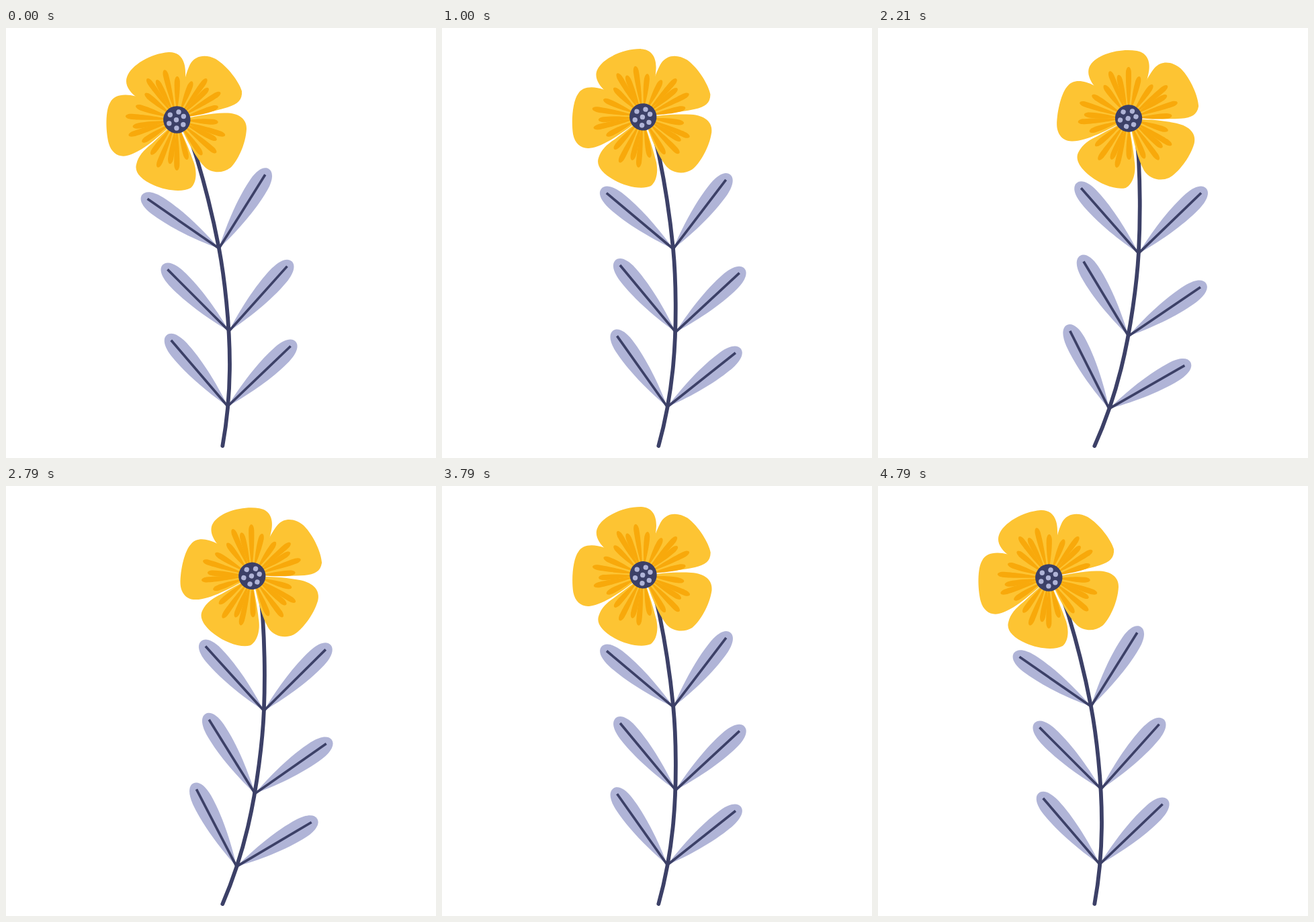
Recreate the animation shown at these times as an HTML page. Size 640 by 640 pixels, loop 4870 ms.

```html
<!DOCTYPE html>
<html lang="en">
<head>
<meta charset="utf-8">
<title>Swaying flower</title>
<style>
  html, body { margin: 0; width: 100%; height: 100%; overflow: hidden; background: #fff; }
  svg { display: block; width: 100%; height: 100%; }
  .leaf { fill: #b0b4d7; }
  .stem, .vein { fill: none; stroke: #3c4067; }
  .stem { stroke-width: 5.8; stroke-linecap: round; }
  .vein { stroke-width: 3.7; }
  .petal { fill: #fdc433; }
  .streak { fill: #f8a90b; }
  .eye { fill: #3c4067; }
  .seed { fill: #b0b4d7; }
</style>
</head>
<body>
<svg viewBox="0 0 640 640">
  <g id="plant">
    <g id="leaves"></g>
    <path class="stem" d="M322.3 622C327 596 333 555 333 500C333 440 325 370 317 328C308 281 297 237 284 194C280 181 276 171 274 165"/>
    <g id="flower">
      <path class="petal" d="M254 134L196 104C184 96 176 84 180 73C186 55 216 38 242 36C258 35 267 47 267 66C268 90 262 115 256 134Z"/>
      <path class="petal" d="M256 134C258 108 266 70 274 54C282 40 298 39 312 46C330 57 347 80 351 94C352 107 345 113 330 118C305 126 275 130 256 135Z"/>
      <path class="petal" d="M258 137C280 131 305 127 325 126.5C345 126 358 134 358 150C357 172 345 198 334 208C322 217 306 216 296 207C284 195 270 170 257 140Z"/>
      <path class="petal" d="M255 140C262 158 272 178 278 196C285 212 284 230 275 238C262 245 238 242 220 234C200 225 191 214 194 203C197 190 205 182 216 173C230 160 245 147 254 138Z"/>
      <path class="petal" d="M250 134C230 117 212 105 193 101.5C175 97 160 100 155 111C148 122 148 152 153 172C157 186 168 193 180 190C200 186 230 160 252 139Z"/>
    </g>
  </g>
</svg>
<script>
const PIVOT = '322 622';
const EYE = [254.3, 136.5];
const LOOP = 4870, FPS = 14, LAST = 67, SWAY = 14.1;

const byId = id => document.getElementById(id);

function add(parent, tag, attrs) {
  const el = document.createElementNS('http://www.w3.org/2000/svg', tag);
  for (const key in attrs) el.setAttribute(key, attrs[key]);
  return parent.appendChild(el);
}

// Leaf pairs: node x, y, then the right and left directions in degrees.
const pairs = [
  [317, 328, 57.9, 145.3],
  [332, 451, 48.1, 135],
  [330, 563, 43.7, 130.6]
];
const leafShape = 'M0 0C30-8 75-16.5 112-15C130-14 139.5-8 139.5 0' +
                  'C139.5 8 130 14 112 15C75 16.5 30 8 0 0Z';
for (const [x, y, ...angles] of pairs) {
  for (const a of angles) {
    const g = add(byId('leaves'), 'g', { transform: `translate(${x} ${y}) rotate(${-a})` });
    add(g, 'path', { class: 'leaf', d: leafShape });
    add(g, 'path', { class: 'vein', d: 'M0 0H129.5' });
  }
}

// The same fan of streaks on each petal: angle offset and length.
const flower = byId('flower');
const fan = [[25.5, 62], [11, 76], [2, 67], [-11, 77], [-25.5, 65]];
for (let k = 0; k < 5; k++) {
  for (const [turn, len] of fan) {
    const a = 43 + 72 * k + turn;
    add(flower, 'path', {
      class: 'streak',
      transform: `translate(${EYE}) rotate(${-a})`,
      d: `M12 0C30-3 ${len - 20}-4.5 ${len - 8}-4C${len + 2}-3 ${len + 2} 3 ${len - 8} 4` +
         `C${len - 20} 4.5 30 3 12 0Z`
    });
  }
}

add(flower, 'circle', { class: 'eye', cx: EYE[0], cy: EYE[1], r: 20.2 });
const seeds = [[2.7, -11.5], [-10, -7.3], [10, -5], [-0.8, 0.3], [-11.5, 5.5], [9.5, 7.2], [-0.4, 12.5]];
for (const [x, y] of seeds) {
  add(flower, 'circle', { class: 'seed', cx: EYE[0] + x, cy: EYE[1] + y, r: 3.7 });
}

// Time in ms and progress of the swing; a cosine eases each way.
const steps = [[0, 0], [1000, .419], [1570, .662], [2210, .925], [2395, 1],
               [3290, .611], [3790, .419], [4790, 0]];

function progress(t) {
  const i = Math.max(1, steps.findIndex(s => s[0] >= t));
  const [t0, p0] = steps[i - 1], [t1, p1] = steps[i];
  return p0 + (p1 - p0) * (t - t0) / (t1 - t0);
}

function draw(now) {
  const tick = Math.min(LAST, Math.floor((now % LOOP + 5) * FPS / 1000));
  const t = Math.min(4790, tick * 1000 / FPS);
  const angle = SWAY * (1 - Math.cos(Math.PI * progress(t))) / 2;
  byId('plant').setAttribute('transform', `rotate(${angle.toFixed(3)} ${PIVOT})`);
}

const start = performance.now();
function loop() {
  draw(performance.now() - start);
  requestAnimationFrame(loop);
}
loop();
</script>
</body>
</html>
```
